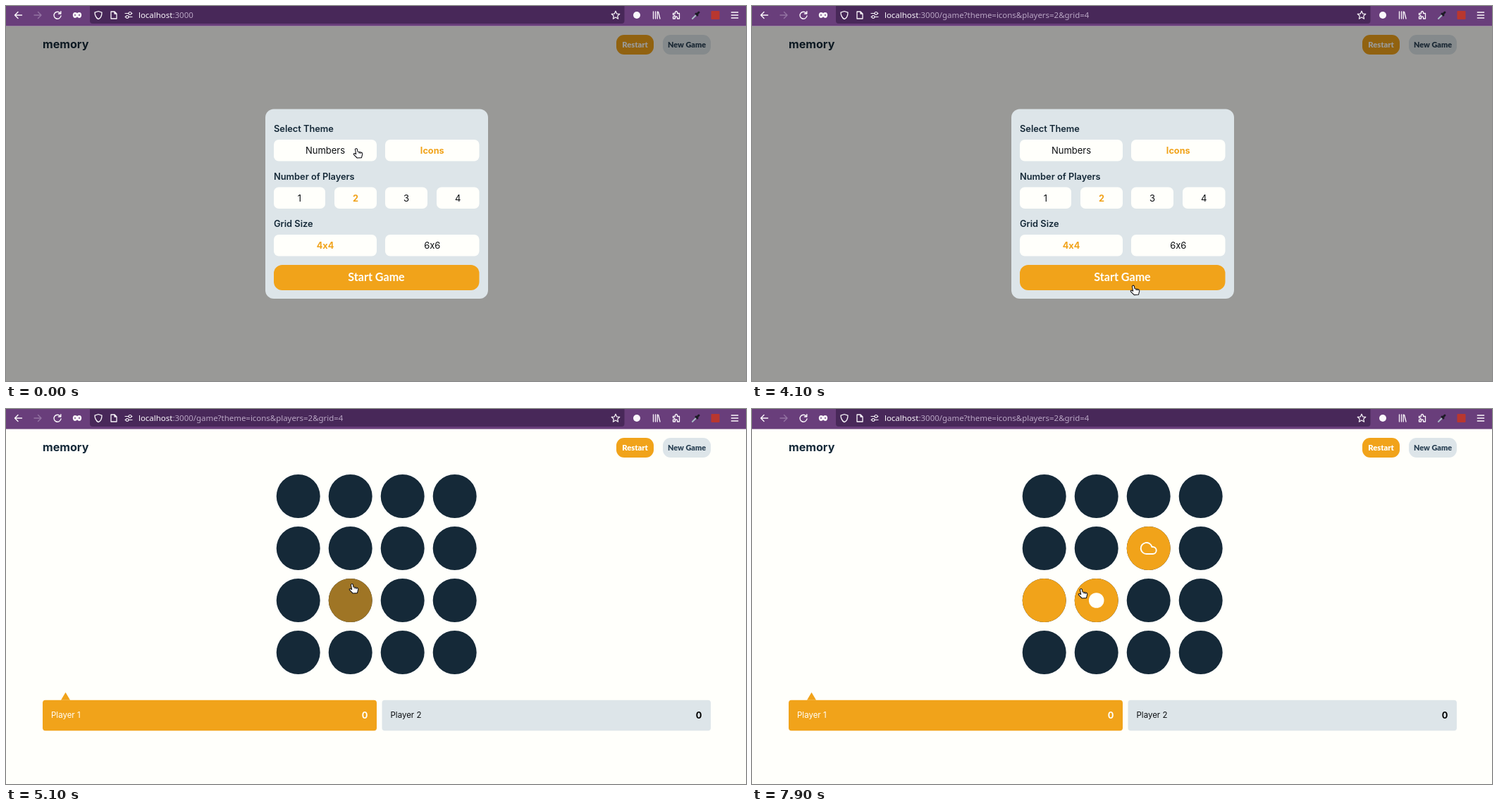
These frames come from a looping animation (1050x533 px, 8 s). An HTML page with a canvas:

```html
<!DOCTYPE html>
<html lang="en">
<head>
<meta charset="utf-8">
<title>memory</title>
<style>
html, body { margin: 0; width: 100%; height: 100%; overflow: hidden; background: #fffffb; }
canvas { display: block; }
</style>
</head>
<body>
<canvas id="stage" width="1050" height="533"></canvas>
<script>
const g = document.getElementById('stage').getContext('2d');
const LOOP = 8000, STEP = 100;
const ORANGE = '#f1a31a', NAVY = '#152938', PALE = '#dde5e9', PAPER = '#fffffb', INK = '#0c0f12';
const INTER = 'Inter, sans-serif', LATO = 'Lato, sans-serif', NOTO = '"Noto Sans", sans-serif';

// pointer tip: time, x, y
const TRACK = [
  [0, 497, 202], [100, 491, 208], [200, 491, 208], [300, 476, 208], [400, 476, 208],
  [500, 464, 208], [1200, 464, 208], [2100, 574, 284], [2600, 547.5, 325], [2700, 547.5, 325],
  [2900, 548, 327], [3000, 548, 327], [3200, 561, 304], [3600, 542, 396.5], [3800, 542, 396.5],
  [3900, 541, 396], [4200, 541, 397], [4500, 526, 333], [4600, 526, 333], [4700, 517, 311],
  [4900, 448, 290], [5100, 491, 248], [5500, 491, 248], [5900, 558, 197], [6000, 561, 194],
  [6100, 561, 194], [6200, 545, 212], [6300, 470, 255], [6400, 424, 262], [7800, 424, 262],
  [7900, 467, 255]
];

// options: x, y, width, label, chosen
const OPTIONS = [
  [380, 190, 146, 'Numbers'], [538, 190, 133.5, 'Icons', true],
  [380, 257.5, 73, '1'], [466, 257.5, 60, '2', true], [538, 257.5, 60, '3'], [611, 257.5, 60.5, '4'],
  [380, 325, 146, '4x4', true], [538, 325, 133.5, '6x6']
];

// turned cards: column, row, time it lights up, time its symbol shows
const TURNED = [[1, 2, 5000, 5300], [2, 1, 5800, 6100], [0, 2, 6200, Infinity]];
const FADE = 160, R = 31;
const cardX = c => 414.7 + 74 * c, cardY = r => 124 + 74 * r;

function box(x, y, w, h, r, color) {
  g.fillStyle = color;
  g.beginPath();
  g.roundRect(x, y, w, h, r);
  g.fill();
}

function disc(x, y, r, color) {
  g.fillStyle = color;
  g.beginPath();
  g.arc(x, y, r, 0, 7);
  g.fill();
}

function text(s, x, y, size, weight, family, color, align = 'left') {
  g.font = `${weight} ${size}px ${family}`;
  g.fillStyle = color;
  g.textAlign = align;
  g.fillText(s, x, y);
}

function shape(d, x, y, stroke, width = 1.4, fill) {
  const p = new Path2D(d);
  g.save();
  g.translate(x, y);
  g.lineWidth = width;
  g.lineCap = g.lineJoin = 'round';
  if (fill) { g.fillStyle = fill; g.fill(p, 'evenodd'); }
  if (stroke) { g.strokeStyle = stroke; g.stroke(p); }
  g.restore();
}

function toolbar(t) {
  const W = '#fbf8fc', DIM = '#b9a6c4';
  box(0, 0, 1050, 28.5, 0, '#693e7b');
  box(119, -6, 758.5, 31, 4, '#482859');
  shape('M5 0H-5M-.5-4.5L-5 0L-.5 4.5', 17.5, 13, W);
  shape('M-5 0H5M.5-4.5L5 0L.5 4.5', 45, 13, '#9474a3');
  shape('M4.2-2.6A5 5 0 1 0 5 1M4.8-5.4V-2H1.4', 73, 13, W);
  shape('M-3-4Q-1-4 0-2.8Q1-4 3-4C7.5-4 7 4 3 4Q1 4 0 2.2Q-1 4-3 4C-7 4-7.5-4-3-4Z' +
    'M-4.5 0Q-3-2-1.5 0Q-3 1.6-4.5 0ZM1.5 0Q3-2 4.5 0Q3 1.6 1.5 0Z', 101, 13, null, 1, W);
  shape('M0-5.5L5-3.8C5 1 3.5 4 0 5.7C-3.5 4-5-1-5-3.8Z', 131, 13, W, 1.3);
  shape('M-4-5H1L4-2V5H-4ZM1-5V-2H4', 153, 13, W, 1.3);
  shape('M-5-2.5H0M4-2.5H5M-5 2.5H-4M0 2.5H5M4-2.5A2 2 0 1 1 0-2.5A2 2 0 1 1 4-2.5' +
    'M0 2.5A2 2 0 1 1-4 2.5A2 2 0 1 1 0 2.5', 174, 13, W, 1.2);
  text('localhost', 188, 17, 11.45, 400, NOTO, W);
  text(':3000' + (t < 4100 ? '' : '/game?theme=icons&players=2&grid=4'), 236.5, 17, 11.45, 400, NOTO, DIM);
  shape('M0-5.8L1.7-1.9L5.8-1.6L2.7 1.2L3.6 5.2L0 3.1L-3.6 5.2L-2.7 1.2L-5.8-1.6L-1.7-1.9Z', 865, 13, W, 1.2);
  disc(895, 13, 5, W);
  shape('M-4.5-5V5M-1.5-5V5M1.2-5V5M2.6-4.5L5 5', 923, 13, W, 1.3);
  shape('M-4.5-2.5H-1.5V-4A1.5 1.5 0 0 1 1.5-4V-2.5H4.5V5H1.5V3.5A1.5 1.5 0 0 0-1.5 3.5V5H-4.5V2.2H-3.3' +
    'A1.3 1.3 0 0 0-3.3-.4H-4.5Z', 951, 13, W, 1.3);
  shape('M-5 5L1-1', 979, 13, '#a9b8c4', 2);
  shape('M0-2L2 0M1.5-1.5L4-4', 979, 13, '#1d1b26', 3);
  box(1000.5, 7, 12, 12, 1, '#b9372f');
  shape('M-4.7-4H4.7M-4.7 0H4.7M-4.7 4H4.7', 1034, 13, W, 1.3);
}

function header() {
  text('memory', 52, 60, 16.1, 700, INTER, NAVY);
  box(866, 41, 53, 28, 11, ORANGE);
  text('Restart', 892.5, 59, 11.2, 900, LATO, PAPER, 'center');
  box(932, 41, 68, 28, 11, PALE);
  text('New Game', 966, 59, 10.9, 900, LATO, '#2c4356', 'center');
}

function menu() {
  box(0, 28.5, 1050, 505, 0, 'rgba(0,0,0,.4)');
  box(368, 146.5, 316, 269.5, 12, PALE);
  ['Select Theme', 'Number of Players', 'Grid Size'].forEach((s, i) =>
    text(s, 380, 178.8 + 67.8 * i, 12.8, 600, INTER, NAVY));
  for (const [x, y, w, s, on] of OPTIONS) {
    box(x, y, w, 30.5, 7, PAPER);
    text(s, x + w / 2, y + 20, on ? 12.7 : 13, on ? 700 : 400, INTER, on ? ORANGE : INK, 'center');
  }
  box(380, 368, 291.5, 36, 12, ORANGE);
  text('Start Game', 525.5, 391.3, 16.1, 700, LATO, PAPER, 'center');
}

function mix(k) {
  const a = [21, 41, 56], b = [241, 163, 26];
  return `rgb(${a.map((v, i) => Math.round(v + (b[i] - v) * k))})`;
}

function cards(t) {
  for (let i = 0; i < 16; i++) disc(cardX(i % 4), cardY(i >> 2), R, NAVY);
  TURNED.forEach(([c, r, lit, shown], i) => {
    const x = cardX(c), y = cardY(r);
    if (t >= lit) disc(x, y, R, mix(Math.min(1, (t - lit) / FADE)));
    if (t < shown) return;
    if (i) shape('M18 10h-1.26A8 8 0 1 0 9 20h9a5 5 0 0 0 0-10z', x - 12, y - 12, PAPER, 1.9);
    else disc(x, y, 10.8, PAPER);
  });
}

function players(y) {
  shape('M78 0L84.5-11L91 0Z', 0, y, null, 1, ORANGE);
  box(52, y, 474, 43.5, 4, ORANGE);
  text('Player 1', 64, y + 25, 11.5, 400, INTER, PAPER);
  text('0', 509, y + 26.5, 12.8, 700, INTER, PAPER, 'center');
  box(533.5, y, 466.5, 43.5, 4, PALE);
  text('Player 2', 545.5, y + 25, 11.5, 400, INTER, INK);
  text('0', 983, y + 26.5, 12.8, 700, INTER, '#000', 'center');
}

function pointerAt(t) {
  const n = TRACK.findIndex(k => k[0] > t);
  if (n < 0) return TRACK[TRACK.length - 1].slice(1);
  const [t0, x0, y0] = TRACK[n - 1], [t1, x1, y1] = TRACK[n];
  const k = (t - t0) / (t1 - t0);
  return [x0 + (x1 - x0) * k, y0 + (y1 - y0) * k];
}

function clickable(t, x, y) {
  const within = (l, top, w, h) => x >= l && x <= l + w && y >= top && y <= top + h;
  if (t < 4200) return OPTIONS.some(o => within(o[0], o[1], o[2], 30.5)) || within(380, 368, 291.5, 36);
  if (t < 4300) return false;
  for (let i = 0; i < 16; i++)
    if (Math.hypot(x - cardX(i % 4), y - cardY(i >> 2)) < R) return true;
  return false;
}

function pointer(t) {
  const [x, y] = pointerAt(t);
  if (clickable(t, x, y))
    shape('M-1.6 1.6Q-.2-.6 1.3 1.4L2 5L7 6Q9 6.5 8.8 8.2L8 11.5L7.4 13.6L1.2 14L-3.6 9.2Q-4.2 7.4-2.4 7.5L-.3 8.6Z' +
      'M4.2 5.6V7.2M6.4 6V7.4', x, y, '#15151a', 1.1, '#fff');
  else
    shape('M0 0V12L3 9.4L5 13.6L7 12.7L5.1 8.7H9Z', x, y, '#fff', 1.6),
    shape('M0 0V12L3 9.4L5 13.6L7 12.7L5.1 8.7H9Z', x, y, null, 1, '#111');
}

function draw(now) {
  const t = Math.floor(now % LOOP / STEP) * STEP;
  box(0, 0, 1050, 533, 0, PAPER);
  header();
  if (t < 4200) menu();
  else if (t < 4300) players(130);
  else { cards(t); players(413.7); }
  toolbar(t);
  pointer(t);
}

let start;
function tick(now) {
  start ??= now;
  draw(now - start);
  requestAnimationFrame(tick);
}
requestAnimationFrame(tick);
</script>
</body>
</html>
```
